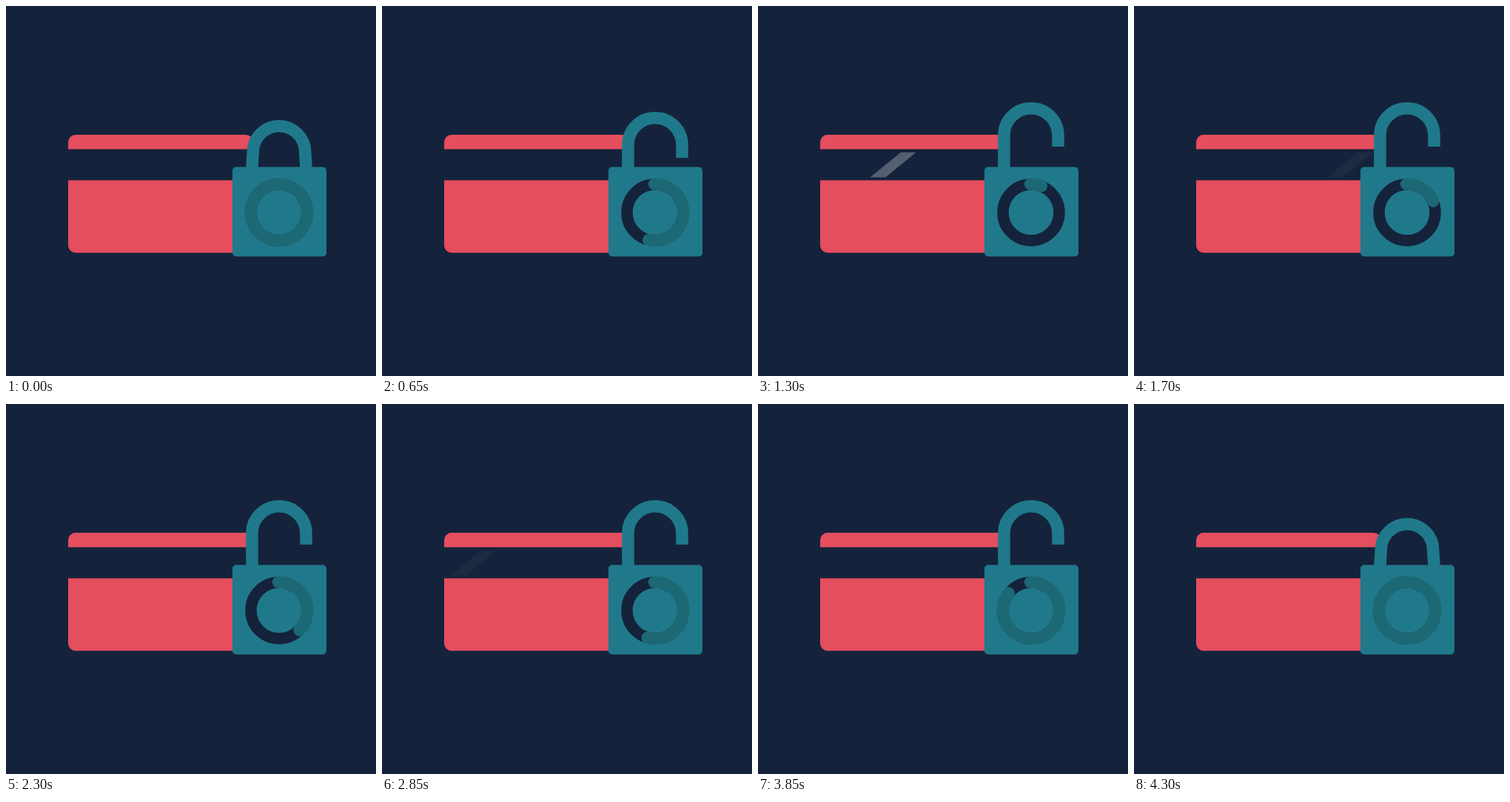
These frames come from a looping animation (500 px wide and 500 px high, 7 s). An HTML page:

```html
<!DOCTYPE html>
<html lang="en">
<head>
<meta charset="utf-8">
<title>Card and padlock</title>
<style>
  html, body { margin: 0; height: 100%; overflow: hidden; background: #14233b; }
  svg { display: block; width: 100%; height: 100%; }
</style>
</head>
<body>
<svg viewBox="0 0 500 500">
  <g fill="#e44e5f">
    <path d="M84 193.5V184a10 10 0 0 1 10-10H324a10 10 0 0 1 10 10V193.5Z"/>
    <path d="M84 235.5H334V323.5a10 10 0 0 1-10 10H94a10 10 0 0 1-10-10Z"/>
  </g>
  <path id="shine" fill="#fff" d="M0 231.5L41.7 197.8H62L21 231.5Z"/>
  <path id="shackle" fill="none" stroke="#20798b" stroke-width="16.5"/>
  <rect x="306" y="217.5" width="127" height="121" rx="5" fill="#20798b"/>
  <g fill="none">
    <circle cx="369" cy="279" r="38" stroke="#14233b" stroke-width="15.5"/>
    <circle id="ring" cx="369" cy="279" r="38.3" stroke="#1d6875" stroke-width="16.3"
      stroke-linecap="round" pathLength="360" transform="rotate(-91.5 369 279)"/>
  </g>
</svg>
<script>
const LOOP = 7000, STEP = 50;
const [shine, shackle, ring] = ['shine', 'shackle', 'ring'].map(id => document.getElementById(id));

const clamp = (v, lo = 0, hi = 1) => Math.min(hi, Math.max(lo, v));
const progress = (t, from, to) => clamp((t - from) / (to - from));
const ease = u => (1 - Math.cos(Math.PI * u)) / 2;

function drawShackle(open) {
  const r = 35.2 + 1.3 * clamp(open * 2.2);   // legs splay slightly when closed
  const y = 162.2 - 24 * open + r;
  const end = 218 - 28 * open;
  shackle.setAttribute('d',
    `M332.5 230V${Math.max(end, 217)}L${369 - r} ${y}` +
    `A${r} ${r} 0 0 1 ${369 + r} ${y}L405.5 ${end}`);
}

function drawRing(angle) {
  ring.style.display = angle > 0 ? '' : 'none';
  ring.setAttribute('stroke-dasharray', angle < 360 ? `${angle} 400` : 'none');
}

function drawShine(t) {
  const mid = t < 2300 ? 1375 : 3175;
  const u = clamp((t - mid) / 400, -1, 1);
  const x = 177 + 88 * Math.sin(u * Math.PI / 2);
  shine.setAttribute('transform', `translate(${x} 0)`);
  shine.setAttribute('opacity', 0.295 * (1 - u * u) ** 2);
}

function draw(t) {
  const unlock = ease(progress(t, 425, 900));
  drawShackle(unlock - ease(progress(t, 4075, 4300)));
  drawRing(t < 1000 ? 360 * (1 - unlock) : 360 * progress(t, 1095, 4300));
  drawShine(t);
}

const start = performance.now();
function tick() {
  const t = (performance.now() - start) % LOOP;
  draw(Math.floor(t / STEP) * STEP);
  requestAnimationFrame(tick);
}
tick();
</script>
</body>
</html>
```
